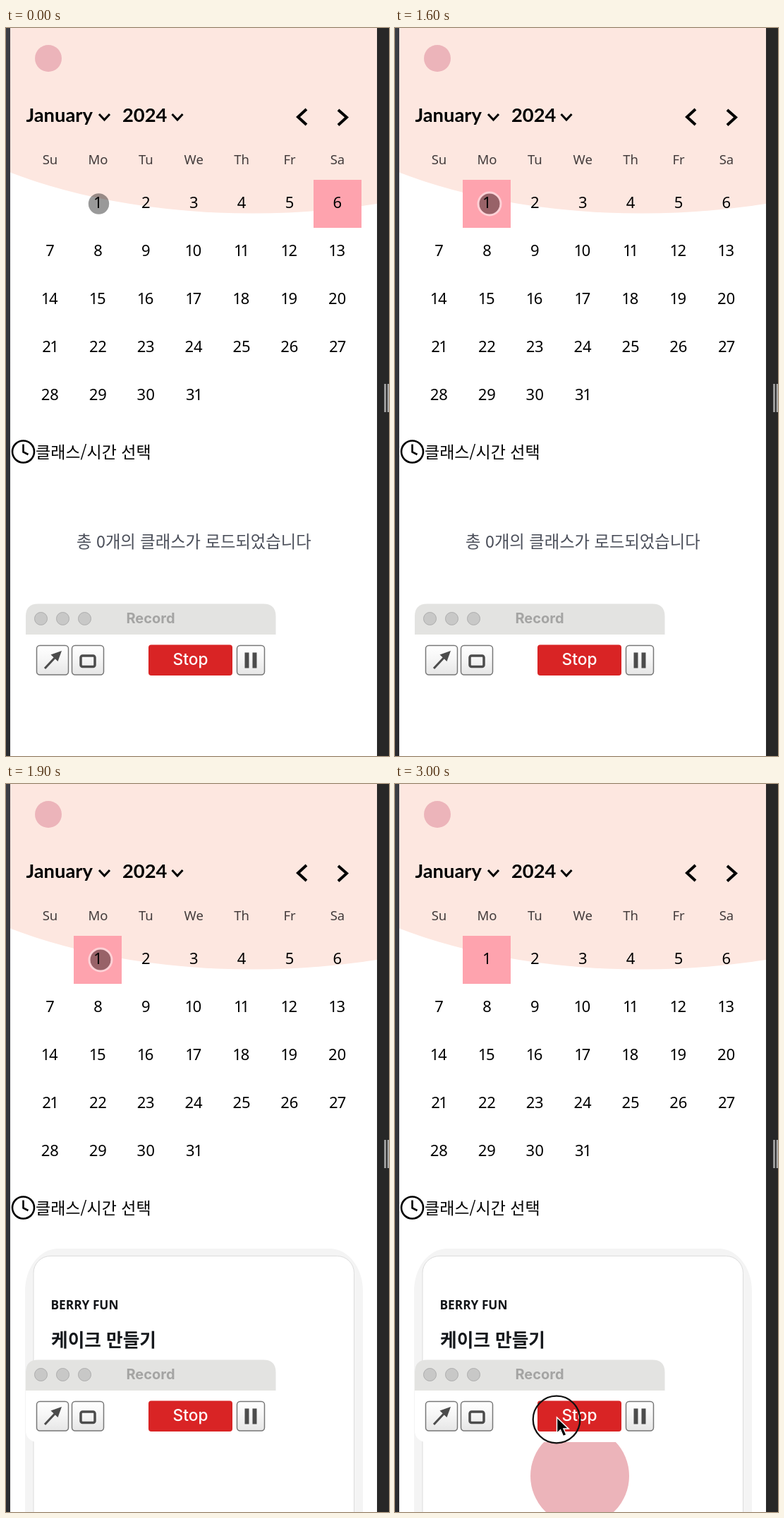
These frames come from a looping animation (543 by 1031 pixels, 3100 ms). An HTML page:

```html
<!DOCTYPE html>
<html lang="ko">
<head>
<meta charset="utf-8">
<title>Calendar</title>
<style>
  html, body { margin: 0; width: 100%; height: 100%; overflow: hidden; background: #fff; }
  svg { display: block; width: 100%; height: 100%; }
  text { font-family: "Noto Sans CJK KR", "Noto Sans CJK", sans-serif; }
  .month { font: 700 27.3px Lato, sans-serif; }
  .weekday { font: 18.5px "Noto Sans", sans-serif; fill: #423b3b; text-anchor: middle; }
  .date { font: 22px "Noto Sans", sans-serif; font-variant-numeric: lining-nums proportional-nums; text-anchor: middle; }
  .tag { font: 700 17.3px "Noto Sans", sans-serif; fill: #111418; }
  .ui { font-family: Inter, sans-serif; text-anchor: middle; }
  .line { fill: none; stroke: #000; }
  .button { fill: url(#face); stroke: #777; stroke-width: 1.5; }
</style>
</head>
<body>
<svg viewBox="0 0 543 1031" preserveAspectRatio="none">
  <defs>
    <linearGradient id="face" x2="0" y2="1">
      <stop stop-color="#fff"/><stop offset=".45" stop-color="#f6f6f6"/><stop offset="1" stop-color="#e6e6e6"/>
    </linearGradient>
    <linearGradient id="edge" x2="0" y2="1">
      <stop stop-color="#3b3e45"/><stop offset="1" stop-color="#292b30"/>
    </linearGradient>
  </defs>

  <rect width="543" height="1031" fill="#fff"/>
  <ellipse cx="350" cy="30" rx="520" ry="232.5" fill="#fde7e0"/>
  <rect width="6" height="1031" fill="url(#edge)"/>
  <rect x="526" width="17" height="1031" fill="#272727"/>
  <path d="M537.5 504v40M542 504v40" stroke="#aaa" stroke-width="2.6"/>
  <circle cx="60" cy="43" r="19" fill="#ecb4ba"/>

  <text class="month" x="28.5" y="132.5">January</text>
  <text class="month" x="165" y="132.5">2024</text>
  <path class="line" stroke-width="3" d="M132 122l7.5 8 7.5-8M235.5 122l7.5 8 7.5-8"/>
  <path class="line" stroke-width="4" d="M426 115l-12 11 12 11M471 116l12 10.5-12 11"/>

  <rect id="selected" y="215" width="68" height="68" fill="#fea3ae"/>
  <g id="calendar"></g>

  <g class="line" stroke-width="2.6">
    <circle cx="24.5" cy="600" r="15.5"/>
    <path d="M24.5 589.5v11l7 3.5"/>
  </g>
  <text x="42" y="608.5" font-size="23">클래스/시간 선택</text>
  <text id="empty" x="100" y="735.5" font-size="23.3" fill="#4b4f5a">총 0개의 클래스가 로드되었습니다</text>

  <g id="card">
    <rect x="27" y="658" width="479" height="460" rx="47" ry="60" fill="#f4f4f4"/>
    <rect x="39" y="668.5" width="454.5" height="440" rx="24" fill="#fff" stroke="#dcdcdc"/>
    <text class="tag" x="63.5" y="744">BERRY FUN</text>
    <text x="64" y="796.5" font-size="25.7" font-weight="700" fill="#15181c">케이크 만들기</text>
    <circle id="picture" cx="262" cy="980" r="70" fill="#ecb4ba"/>
  </g>

  <rect x="28" y="816" width="354.5" height="116" rx="16" fill="#fff"/>
  <path d="M28 859v-26q0-17.5 17.5-17.5h319.5q17.5 0 17.5 17.5v26z" fill="#e3e3e1"/>
  <g id="lights" fill="#c8c8c7" stroke="#adadad"></g>
  <text class="ui" x="205" y="842.5" font-size="20" font-weight="700" fill="#a4a4a3">Record</text>
  <rect class="button" x="43.5" y="874.5" width="45" height="41.5" rx="4.5"/>
  <rect class="button" x="93.5" y="874.5" width="45" height="41.5" rx="4.5"/>
  <rect class="button" x="327.5" y="874.5" width="39" height="41.5" rx="4.5"/>
  <path d="M55 907l15-16" stroke="#4c4c4c" stroke-width="3"/>
  <path d="M79 882l-5.5 15-10-9.5z" fill="#4c4c4c"/>
  <rect x="106" y="889" width="20" height="15.5" rx="2.5" fill="none" stroke="#4c4c4c" stroke-width="3.5"/>
  <path d="M341.5 884.5v22M352.5 884.5v22" stroke="#4c4c4c" stroke-width="6"/>
  <rect x="202" y="873.5" width="119" height="43.5" rx="4" fill="#d92425"/>
  <text class="ui" x="261.5" y="901.5" font-size="22.7" font-weight="500" fill="#fff">Stop</text>

  <g id="touch">
    <circle r="14.7" fill-opacity=".4"/>
    <circle id="halo" r="16" fill="none" stroke="#fff" stroke-opacity=".5" stroke-width="3"/>
  </g>
  <circle id="ring" cx="229" cy="900" r="33.3" fill="none" stroke="#111" stroke-width="2.3"/>
  <path id="pointer" d="M0 0v22.5l5-4.7 4 9 4.5-2-4-8.800h7z" fill="#000" stroke="#fff" stroke-width="1.5"/>
</svg>

<script>
const $ = id => document.getElementById(id);
const LOOP = 3100, STEP = 100;
const columnX = column => 62.5 + 67.9 * column;

// time, x, y of the cursor
const path = [
  [0, 131.5, 249], [700, 128.5, 249], [1200, 131, 249], [1500, 134, 249],
  [2000, 134, 249], [2100, 140, 290], [2200, 155, 420], [2300, 178, 620],
  [2400, 196, 780], [2500, 202, 828.5], [2600, 208, 842], [2700, 219, 870],
  [2800, 229.5, 897], [3100, 229.5, 897]
];

const weekdays = ['Su', 'Mo', 'Tu', 'We', 'Th', 'Fr', 'Sa'].map((name, i) =>
  `<text class="weekday" x="${columnX(i)}" y="192.5">${name}</text>`);
const dates = Array.from({ length: 31 }, (_, i) => {
  const day = i + 1;
  return `<text class="date" x="${columnX(day % 7)}" y="${255 + 68 * Math.floor(day / 7)}">${day}</text>`;
});
$('calendar').innerHTML = weekdays.concat(dates).join('');
$('lights').innerHTML = [49.5, 80.5, 111.5].map(x => `<circle cx="${x}" cy="836.5" r="9"/>`).join('');

function cursorAt(t) {
  const next = path.findIndex(point => point[0] > t);
  const [t0, x0, y0] = path[next - 1], [t1, x1, y1] = path[next];
  const k = (t - t0) / (t1 - t0);
  return [x0 + (x1 - x0) * k, y0 + (y1 - y0) * k];
}

const show = (id, visible) => $(id).setAttribute('visibility', visible ? 'visible' : 'hidden');

function draw(t) {
  const chosen = t >= 1600, loaded = t >= 1700, desktop = t >= 2600;
  const place = `translate(${cursorAt(t)})`;

  $('selected').setAttribute('x', chosen ? 96 : 436);
  show('empty', !loaded);
  show('card', loaded);
  $('picture').setAttribute('opacity', Math.min(1, Math.max(0, (t - 1900) / 300)));

  $('touch').setAttribute('transform', place);
  $('touch').setAttribute('display', desktop ? 'none' : 'inline');
  show('halo', chosen && t < 2000);
  $('pointer').setAttribute('transform', place);
  show('pointer', desktop);
  show('ring', t >= 2900);
}

const start = performance.now();
function tick() {
  const t = (performance.now() - start) % LOOP;
  draw(Math.floor(t / STEP) * STEP);
  requestAnimationFrame(tick);
}
tick();
</script>
</body>
</html>
```
